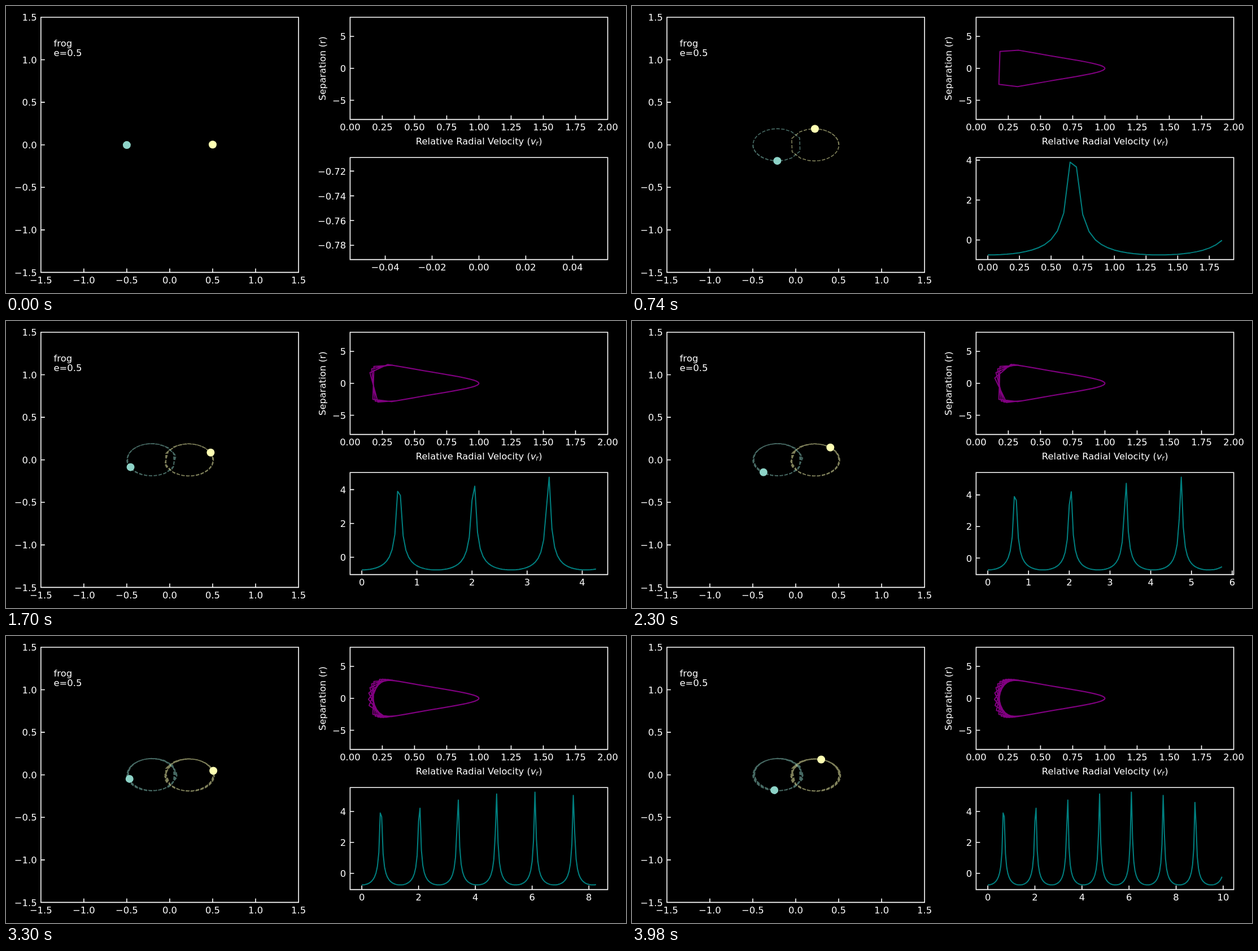
Write an HTML page that moves like this. It is 1098x510 px and loops after 4000 ms.

```html
<!DOCTYPE html>
<html lang="en">
<head>
<meta charset="utf-8">
<title>Leapfrog orbit</title>
<style>
  html, body { margin: 0; width: 100%; height: 100%; overflow: hidden; background: #000; }
  svg { display: block; width: 100%; height: 100%; }
  text { font: 16.4px "DejaVu Sans", sans-serif; fill: #fff; }
  .axis { fill: none; stroke: #fff; stroke-width: 1.6; }
  .line { fill: none; stroke-linejoin: round; stroke-width: 2; }
  .trail { stroke-width: 1.64; stroke-dasharray: 6.07 2.62; stroke-opacity: .5; }
  .mid { text-anchor: middle; }
  .end { text-anchor: end; }
</style>
</head>
<body>
<svg viewBox="0 0 1098 510">
  <rect width="1098" height="510"/>
  <path id="trailA" class="line trail" stroke="#8dd3c7"/>
  <path id="trailB" class="line trail" stroke="#feffb3"/>
  <circle id="dotA" r="7" fill="#8dd3c7"/>
  <circle id="dotB" r="7" fill="#feffb3"/>
  <path id="phase" class="line" stroke="#800080"/>
  <path id="energy" class="line" stroke="#008080"/>
  <g id="fixedAxes"></g>
  <g id="liveAxes"></g>
  <text x="84.5" y="72">frog</text>
  <text x="84.5" y="89">e=0.5</text>
  <text class="mid" transform="translate(566 111) rotate(-90)">Separation (r)</text>
  <text class="mid" x="837.8" y="245.5">Relative Radial Velocity (<tspan font-style="italic">v</tspan><tspan font-style="italic" dy="2.6" style="font-size:11.5px">r</tspan><tspan dy="-2.6">)</tspan></text>
</svg>
<script>
const $ = id => document.getElementById(id);
const STEPS = 200, STEP_MS = 20, DT = 0.05;

// Relative orbit, starting at its far point
const GM = 4, ECC = 0.75, A = 4 / 7, B = A * Math.sqrt(1 - ECC * ECC);
const PERIOD = 1.3569, LEAD = 0.005, PRECESS = -0.003, DRIFT = 0.0024;

function orbit(t) {
  const turns = (t + LEAD) / PERIOD, lap = Math.round(turns);
  const mean = 2 * Math.PI * (turns - lap);
  let u = 0;
  for (let k = 0; k < 25; k++)
    u -= (u + ECC * Math.sin(u) - mean) / (1 + ECC * Math.cos(u));
  const x = A * (ECC + Math.cos(u)), y = B * Math.sin(u);
  const r = A * (1 + ECC * Math.cos(u));
  const c = Math.cos(PRECESS * lap), s = Math.sin(PRECESS * lap);
  return {
    t, r,
    dx: (x * c - y * s) / 2,
    dy: (x * s + y * c) / 2,
    cx: DRIFT * t,
    vr: -ECC * Math.sin(u) * Math.sqrt(GM * A) / r,
    energy: 1 / r - 1.7503
  };
}
const data = Array.from({ length: STEPS }, (_, i) => orbit(i * DT));

// A plot area with its data limits
function plot(x0, y0, x1, y1, xlim, ylim, xbins, ybins) {
  return {
    x0, y0, x1, y1, xlim, ylim, xbins, ybins,
    px: v => x0 + (v - xlim[0]) / (xlim[1] - xlim[0]) * (x1 - x0),
    py: v => y1 - (v - ylim[0]) / (ylim[1] - ylim[0]) * (y1 - y0)
  };
}

function ticks([lo, hi], bins) {
  const raw = (hi - lo) / bins, pow = Math.floor(Math.log10(raw));
  const lead = [1, 2, 2.5, 5, 10].find(m => m >= raw / 10 ** pow - 1e-9);
  const step = lead * 10 ** pow;
  const digits = Math.max(0, -pow + (lead === 2.5 ? 1 : lead === 10 ? -1 : 0));
  const list = [];
  for (let k = Math.ceil(lo / step - 1e-9); k <= hi / step + 1e-9; k++)
    list.push({ v: k * step, label: (k * step).toFixed(digits).replace('-', '\u2212') });
  return list;
}

function axes(p) {
  let d = `M${p.x0} ${p.y0}H${p.x1}V${p.y1}H${p.x0}Z`, labels = '';
  for (const { v, label } of ticks(p.xlim, p.xbins)) {
    const x = p.px(v);
    d += `M${x} ${p.y1}v-7`;
    labels += `<text class="mid" x="${x}" y="${p.y1 + 19.8}">${label}</text>`;
  }
  for (const { v, label } of ticks(p.ylim, p.ybins)) {
    const y = p.py(v);
    d += `M${p.x0} ${y}h7`;
    labels += `<text class="end" x="${p.x0 - 7.2}" y="${y + 6.2}">${label}</text>`;
  }
  return `<path class="axis" d="${d}"/>${labels}`;
}

const polyline = (pts, fx, fy) =>
  'M' + pts.map(q => fx(q).toFixed(2) + ' ' + fy(q).toFixed(2)).join('L');

// Limits with a 5% margin; a single value is widened first
function limits(lo, hi) {
  if (hi === lo) {
    const w = 0.05 * (Math.abs(lo) || 1);
    lo -= w;
    hi += w;
  }
  const m = 0.05 * (hi - lo);
  return [lo - m, hi + m];
}

const space = plot(61.8, 20, 518.1, 473.4, [-1.5, 1.5], [-1.5, 1.5], 9, 9);
const phase = plot(609.4, 20, 1065.6, 201.6, [0, 2], [-8, 8], 9, 5);
$('fixedAxes').innerHTML = axes(space) + axes(phase);

function body(name, sign, pts) {
  const fx = q => space.px(q.cx + sign * q.dx), fy = q => space.py(sign * q.dy);
  const last = pts[pts.length - 1];
  $('trail' + name).setAttribute('d', polyline(pts, fx, fy));
  $('dot' + name).setAttribute('cx', fx(last));
  $('dot' + name).setAttribute('cy', fy(last));
}

function draw(i) {
  const pts = data.slice(0, i + 1), es = pts.map(q => q.energy);
  body('A', -1, pts);
  body('B', 1, pts);
  $('phase').setAttribute('d', polyline(pts, q => phase.px(q.r), q => phase.py(q.vr)));
  const live = plot(609.4, 269.2, 1065.6, 450.6,
    limits(0, i * DT), limits(Math.min(...es), Math.max(...es)), 9, 5);
  $('energy').setAttribute('d', polyline(pts, q => live.px(q.t), q => live.py(q.energy)));
  $('liveAxes').innerHTML = axes(live);
}

const start = performance.now();
let shown = -1;
function tick() {
  const i = Math.floor(Math.max(0, performance.now() - start) / STEP_MS) % STEPS;
  if (i !== shown) draw(shown = i);
  requestAnimationFrame(tick);
}
tick();
</script>
</body>
</html>
```
